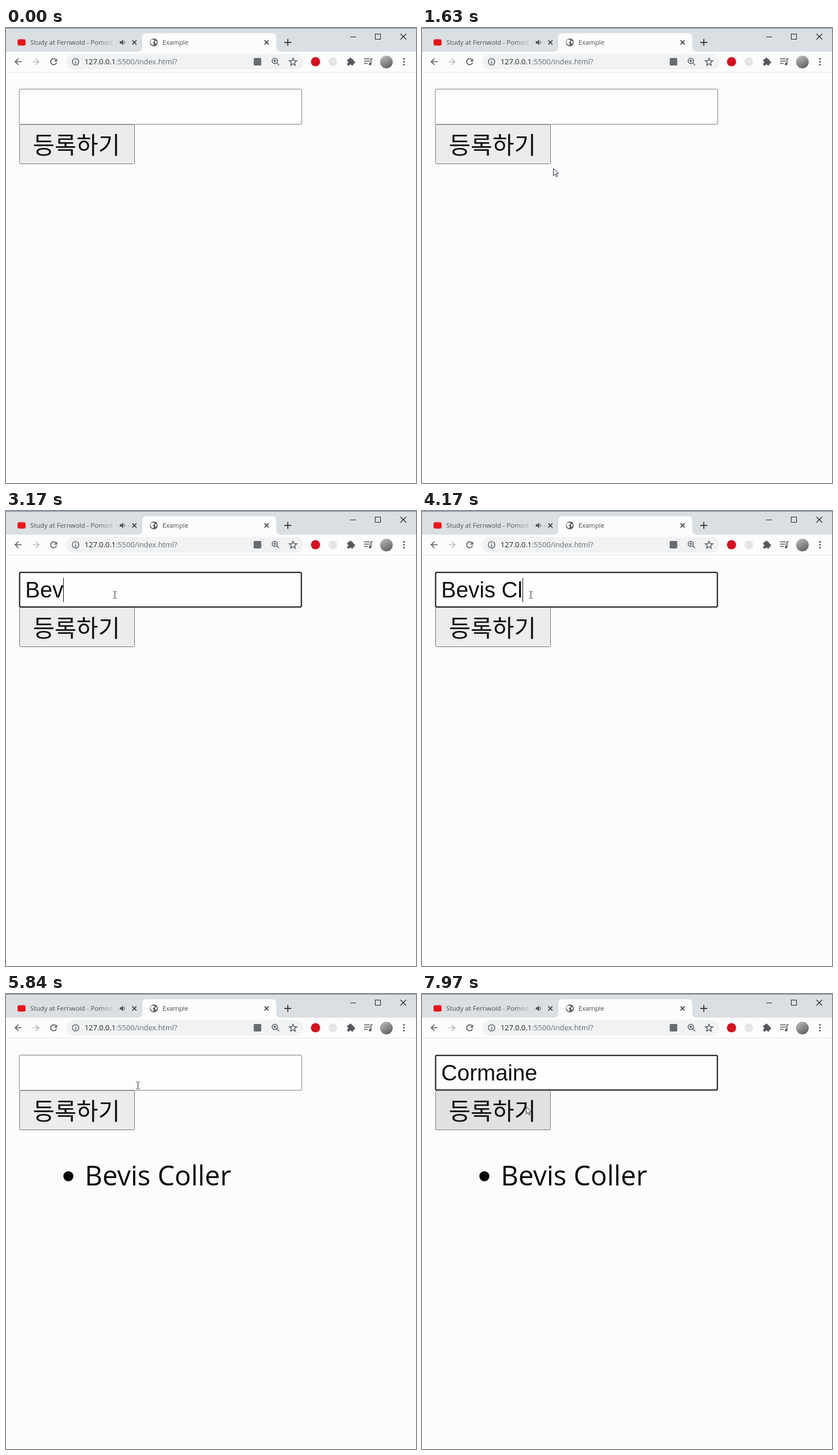
Animation, 710 px wide and 789 px high, one loop 8 s. Source, as an HTML page with a canvas:

```html
<!DOCTYPE html>
<html lang="ko">
<head>
<meta charset="utf-8">
<title>Example</title>
<style>
html, body { margin: 0; width: 100%; height: 100%; overflow: hidden; background: #fcfcfc; }
canvas { display: block; }
</style>
</head>
<body>
<canvas id="stage" width="710" height="789"></canvas>
<script>
const ctx = document.getElementById('stage').getContext('2d');
const LOOP = 8000;
const UI = '"Open Sans", "Noto Sans", sans-serif';
const FIELD = '"Liberation Sans", Arial, sans-serif';
const HANGUL = '"Noto Sans CJK KR", "Noto Sans CJK", "Noto Sans CJK JP", sans-serif';
const ICON = '#55595e';
const FULL_NAME = 'Bevis Coller';

// Keystrokes as [time, field text]
const keys = [[0, '']];
function type(start, step, text, base = '') {
  for (let i = 1; i <= text.length; i++) {
    keys.push([start + step * (i - 1), base + text.slice(0, i)]);
  }
}
keys.push([2080, 'ㅇ'], [2580, '']);
type(2750, 180, 'Bevis Cl');
keys.push([4280, 'Bevis C']);
type(4380, 90, 'oller', 'Bevis C');
keys.push([5400, '']);
type(6250, 150, 'Cormaine');

// Pointer path as [time, x, y]
const path = [
  [430, 699, 290], [830, 540, 312], [1130, 390, 488], [1580, 227, 243],
  [1660, 227, 243], [1900, 188, 145], [4880, 188, 145], [5180, 172, 215],
  [5450, 172, 215], [5800, 228, 158], [7580, 228, 158], [7930, 180, 195]
];

function pointerAt(t) {
  if (t < path[0][0]) return null;
  let i = path.length - 1;
  while (path[i][0] > t) i--;
  const a = path[i], b = path[i + 1];
  if (!b) return { x: a[1], y: a[2] };
  let k = (t - a[0]) / (b[0] - a[0]);
  k = k * k * (3 - 2 * k);
  return { x: a[1] + (b[1] - a[1]) * k, y: a[2] + (b[2] - a[2]) * k };
}

function box(x, y, w, h, r, fill, stroke, width = 1) {
  ctx.beginPath();
  ctx.roundRect(x, y, w, h, r);
  if (fill) { ctx.fillStyle = fill; ctx.fill(); }
  if (stroke) { ctx.strokeStyle = stroke; ctx.lineWidth = width; ctx.stroke(); }
}

function disc(x, y, r, fill) {
  ctx.beginPath();
  ctx.arc(x, y, r, 0, Math.PI * 2);
  ctx.fillStyle = fill;
  ctx.fill();
}

function ring(x, y, r, color, width, from = 0, to = Math.PI * 2) {
  ctx.beginPath();
  ctx.arc(x, y, r, from, to);
  ctx.strokeStyle = color;
  ctx.lineWidth = width;
  ctx.stroke();
}

function line(d, color, width = 1.6) {
  ctx.strokeStyle = color;
  ctx.lineWidth = width;
  ctx.stroke(new Path2D(d));
}

function shape(d, color) {
  ctx.fillStyle = color;
  ctx.fill(new Path2D(d));
}

function text(s, x, y, font, color) {
  ctx.font = font;
  ctx.fillStyle = color;
  ctx.fillText(s, x, y);
}

function cross(x, y, r, color, width) {
  line(`M${x - r} ${y - r}L${x + r} ${y + r}M${x + r} ${y - r}L${x - r} ${y + r}`, color, width);
}

function star(x, y, r) {
  ctx.beginPath();
  for (let i = 0; i < 10; i++) {
    const a = -Math.PI / 2 + i * Math.PI / 5, q = i % 2 ? r * 0.45 : r;
    ctx.lineTo(x + q * Math.cos(a), y + q * Math.sin(a));
  }
  ctx.closePath();
  ctx.strokeStyle = ICON;
  ctx.lineWidth = 1.4;
  ctx.stroke();
}

function drawTabs() {
  ctx.fillStyle = '#dadfe3';
  ctx.fillRect(0, 0, 710, 41);
  ctx.fillStyle = '#6b8299';
  ctx.fillRect(0, 0, 710, 1);
  shape('M228 41Q236 41 236 33V17Q236 9 244 9H460Q468 9 468 17V33Q468 41 476 41Z', '#fcfcfc');

  box(20, 19.5, 14, 11, 3, '#e8141c');
  const fade = ctx.createLinearGradient(160, 0, 191, 0);
  fade.addColorStop(0, '#4b5055');
  fade.addColorStop(1, '#dadfe3');
  ctx.save();
  ctx.beginPath();
  ctx.rect(40, 10, 151, 30);
  ctx.clip();
  text('Study at Fernwold - Pomod', 42, 29, `11.3px ${UI}`, fade);
  ctx.restore();
  shape('M197 23H199.5L203 20V30L199.5 27H197Z', ICON);
  line('M204.5 22.5Q206.5 25 204.5 27.5', ICON, 1.2);
  cross(222.3, 25, 3.6, '#3c4043', 1.6);

  disc(256, 25, 6.8, ICON);
  shape('M251 21Q255 19 257 21Q258 23 255 24Q254 26 256 27Q256 30 254 30Q251 28 250 25Z', '#fcfcfc');
  shape('M258 23Q260 21 261 24Q262 26 259 28Q258 26 258 23Z', '#fcfcfc');
  text('Example', 271, 29, `11.2px ${UI}`, '#45494d');
  cross(451.3, 25, 3.6, '#3c4043', 1.6);
  line('M482 25H494M488 19V31', '#3c4043', 1.8);

  line('M596 15.5H606', '#222', 1);
  ctx.strokeRect(639.5, 10.5, 9, 9);
  cross(688, 15, 5, '#222', 1.1);
}

function drawToolbar() {
  line('M27 58.5H16M21.5 53L16 58.5L21.5 64', ICON, 1.7);
  line('M46 58.5H57M51.5 53L57 58.5L51.5 64', '#b9bcbf', 1.7);
  ring(82.5, 58.5, 5.2, ICON, 1.7, 0.3, 5.5);
  shape('M88.5 53V58.2H83.3Z', ICON);

  box(104, 45, 411, 27, 13.5, '#f0f2f3');
  ring(120.5, 58.5, 5.6, ICON, 1.4);
  line('M120.5 58V62M120.5 55V56.6', ICON, 1.5);
  const font = `12.8px ${UI}`;
  text('127.0.0.1', 136, 63, font, '#202428');
  const hostWidth = ctx.measureText('127.0.0.1').width;
  text(':5500/index.html?', 136 + hostWidth, 63, font, '#666b70');

  box(429, 52, 13, 13, 1.5, '#686c70');
  ring(465.5, 57, 4.6, ICON, 1.5);
  line('M469 60.5L473 64.5M463 57H468M465.5 54.5V59.5', ICON, 1.4);
  star(497, 59, 6.8);

  disc(536, 58.5, 8, '#d3121f');
  disc(566, 58.5, 7.5, '#e4e4e2');
  box(591, 54, 10.5, 11, 1.5, ICON);
  disc(596.5, 54, 2.4, ICON);
  disc(602, 59.5, 2.4, ICON);
  disc(591, 59.5, 1.8, '#fcfcfc');
  disc(596.5, 65, 1.8, '#fcfcfc');
  line('M620 53.5H630M620 57.5H630M620 61.5H626M632 62V53.5H635', ICON, 1.6);
  disc(630.5, 62.5, 2.2, ICON);

  const photo = ctx.createLinearGradient(652, 49, 664, 70);
  photo.addColorStop(0, '#b8b8b8');
  photo.addColorStop(0.5, '#8b8b8b');
  photo.addColorStop(1, '#606060');
  disc(658.7, 59, 11, photo);
  for (const y of [53.5, 58.5, 63.5]) disc(689, y, 1.6, ICON);

  ctx.fillStyle = '#e7e8e8';
  ctx.fillRect(0, 76, 710, 1);
}

function drawPointer(p) {
  ctx.save();
  ctx.translate(Math.round(p.x), Math.round(p.y));
  if (p.inField) {
    line('M-2.5 -5.5H-.5M1.5 -5.5H3.5M.5 -5V6M-2.5 6.5H-.5M1.5 6.5H3.5', '#222', 1);
  } else {
    const arrow = 'M.5 .5V13L3.4 10.3L5.6 15L7.6 14.1L5.5 9.5H9.4Z';
    shape(arrow, '#fff');
    line(arrow, '#26263a', 1);
  }
  ctx.restore();
}

function drawPage(t) {
  const [keyTime, value] = keys.findLast(k => k[0] <= t);
  const composing = value === 'ㅇ';
  const focused = (t >= 1920 && t < 5220) || t >= 5920;
  const dy = composing ? -3 : 0;
  const p = pointerAt(t);
  const hit = (x, y, w, h) => p && p.x >= x && p.x < x + w && p.y >= y && p.y < y + h;
  const pressed = t >= 5220 && t < 5400;
  const hover = hit(23, 167, 200, 69);

  const [inset, border, stroke] = focused ? [1, '#101014', 2] : [0.5, '#77777b', 1];
  box(22.5 + inset, 105.5 + dy + inset, 490 - 2 * inset, 62 - 2 * inset, 2, '#fdfdfd', border, stroke);
  if (composing) {
    text(value, 34, 150 + dy, `40px ${HANGUL}`, '#111');
    ctx.fillRect(35, 156, 37, 2);
  } else {
    text(value, 33.3, 150, `38.4px ${FIELD}`, '#111');
  }

  const caretStart = Math.max(keyTime, t >= 5920 ? 5920 : 1920);
  if (focused && (t - caretStart) % 1000 < 500) {
    const x = composing ? 72 : Math.round(33.3 + ctx.measureText(value).width);
    ctx.fillStyle = '#111';
    ctx.fillRect(x, 116 + (composing ? -1 : 0), 1, 42);
  }

  const face = pressed ? '#f3f3f3' : hover ? '#e1e1e1' : '#ececec';
  box(23.5, 167.5 + dy, 199, 68, 2, face, '#77777b');
  ctx.textAlign = 'center';
  text('등록하기', 122, 218 + dy, `350 41px ${HANGUL}`, '#111');
  ctx.textAlign = 'left';

  if (t >= 5400) {
    disc(108, 316, 8.7, '#050505');
    text(FULL_NAME, 136.5, 332, `47px ${UI}`, '#080808');
  }

  if (p) {
    p.inField = hit(23, 106, 489, 61);
    drawPointer(p);
  }
}

function frame() {
  const t = performance.now() % LOOP;
  ctx.fillStyle = '#fcfcfc';
  ctx.fillRect(0, 0, 710, 789);
  drawTabs();
  drawToolbar();
  drawPage(t);
  requestAnimationFrame(frame);
}
frame();
</script>
</body>
</html>
```
